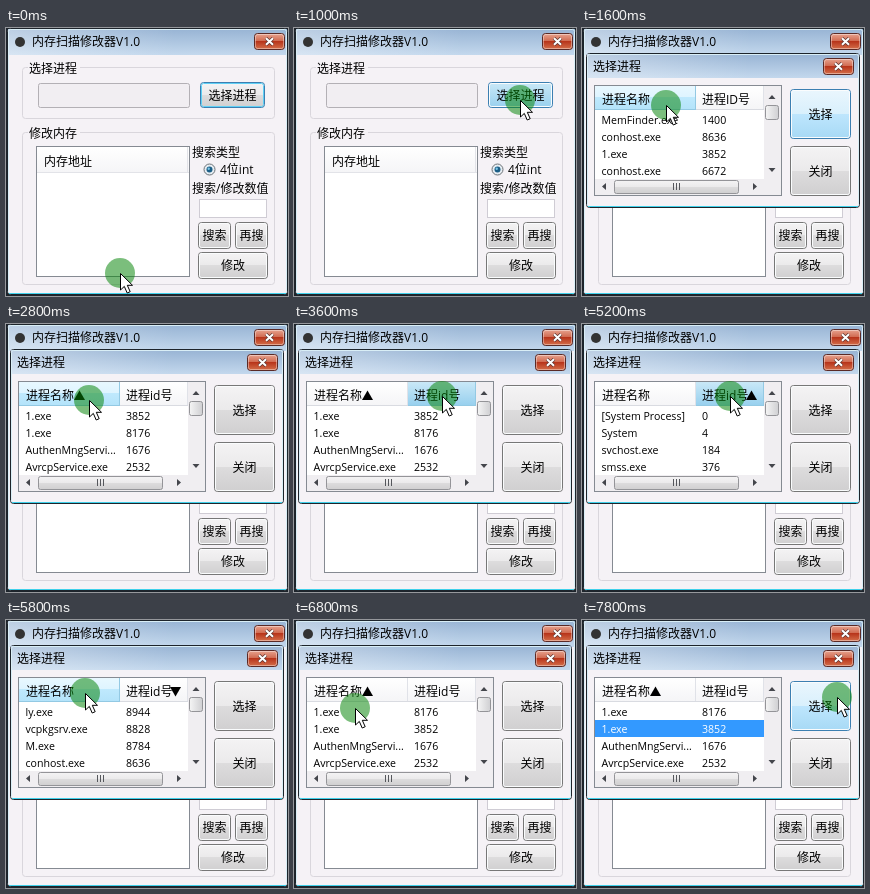
Write an HTML page that moves like this. It is 282 px wide and 268 px high and loops after 8000 ms.

```html
<!DOCTYPE html>
<html lang="zh-CN">
<head>
<meta charset="utf-8">
<title>内存扫描修改器</title>
<style>
html, body { margin: 0; width: 100%; height: 100%; overflow: hidden; background: #f5f2f6; }
svg { display: block; width: 282px; height: 268px; }
text { font: 12px "Open Sans", "Noto Sans CJK SC", "Noto Sans CJK JP", "Noto Sans CJK", sans-serif; fill: #000; white-space: pre; }
text.row { font-size: 10.6px; }
</style>
</head>
<body>
<svg id="stage" viewBox="0 0 282 268" xmlns="http://www.w3.org/2000/svg">
  <defs>
    <linearGradient id="face" x2="0" y2="1">
      <stop offset="0" stop-color="#f4f3f4"/><stop offset=".49" stop-color="#ebeaeb"/>
      <stop offset=".5" stop-color="#dddcdd"/><stop offset="1" stop-color="#d0cfd0"/>
    </linearGradient>
    <linearGradient id="hot" x2="0" y2="1">
      <stop offset="0" stop-color="#eaf6fd"/><stop offset=".49" stop-color="#d9f0fc"/>
      <stop offset=".5" stop-color="#bee6fd"/><stop offset="1" stop-color="#a7d9f5"/>
    </linearGradient>
    <linearGradient id="pressed" x2="0" y2="1">
      <stop offset="0" stop-color="#c9e8f7"/><stop offset="1" stop-color="#98d0ee"/>
    </linearGradient>
    <linearGradient id="header" x2="0" y2="1">
      <stop offset="0" stop-color="#fff"/><stop offset="1" stop-color="#f5f5f7"/>
    </linearGradient>
    <linearGradient id="headerHot" x2="0" y2="1">
      <stop offset="0" stop-color="#e8f8ff"/><stop offset=".49" stop-color="#def4ff"/>
      <stop offset=".5" stop-color="#bfe9fd"/><stop offset="1" stop-color="#b4e3fa"/>
    </linearGradient>
    <linearGradient id="thumbV"><stop offset="0" stop-color="#f5f5f5"/><stop offset="1" stop-color="#cfcfd2"/></linearGradient>
    <linearGradient id="red" x2="0" y2="1">
      <stop offset="0" stop-color="#e8a591"/><stop offset=".48" stop-color="#d0694f"/>
      <stop offset=".5" stop-color="#b8351b"/><stop offset="1" stop-color="#d5714c"/>
    </linearGradient>
    <linearGradient id="titleBar" x2="0" y2="1">
      <stop offset="0" stop-color="#98b4d4"/><stop offset="1" stop-color="#c3d8ed"/>
    </linearGradient>
    <linearGradient id="glow">
      <stop offset="0" stop-color="#fff" stop-opacity=".35"/><stop offset=".6" stop-color="#fff" stop-opacity="0"/>
    </linearGradient>
    <clipPath id="view"><rect x="13" y="59" width="169" height="91.5"/></clipPath>
  </defs>
</svg>
<script>
const stage = document.getElementById('stage');

const rect = (x, y, w, h, fill, stroke = 'none', r = 0) =>
  `<rect x="${x}" y="${y}" width="${w}" height="${h}" rx="${r}" fill="${fill}" stroke="${stroke}"/>`;
const label = (x, y, s, attrs = '') => `<text x="${x}" y="${y}" ${attrs}>${s}</text>`;
const path = (d, fill, stroke = 'none', width = 1) =>
  `<path d="${d}" fill="${fill}" stroke="${stroke}" stroke-width="${width}"/>`;

function button(x, y, w, h, s, state = 'face') {
  const focus = state === 'focus', plain = state === 'face';
  return rect(x + .5, y + .5, w - 1, h - 1, `url(#${focus ? 'face' : state})`, plain ? '#777' : '#3c7fb1', 3) +
    rect(x + 1.5, y + 1.5, w - 3, h - 3, 'none', focus ? '#5fd0f5' : '#fafcfd', 2) +
    label(x + w / 2, y + h / 2 + 4.5, s, 'text-anchor="middle"');
}

function closeButton(x, y) {
  const cross = `M${x + 12} ${y + 5.2}l7 6.6m0 -6.6l-7 6.6`;
  return rect(x + .5, y + .5, 30, 16, 'url(#red)', '#5a2a26', 3) +
    rect(x + 1.5, y + 1.5, 28, 14, 'none', 'rgba(255,255,255,.4)', 2) +
    path(cross, 'none', '#5c3733', 3.4) + path(cross, 'none', '#fff', 2);
}

// Window frame: dark outline, thin cyan edge, title bar and client area.
function frame(x, y, w, h, titleHeight) {
  return rect(x - .5, y - .5, w + 1, h + 1, '#f5f2f6', '#1d242b', 3) +
    rect(x, y, w, titleHeight, 'url(#titleBar)') + rect(x, y, w, titleHeight, 'url(#glow)') +
    rect(x + .5, y + .5, w - 1, h - 1, 'none', '#d9eef6', 2) +
    path(`M${x + 1} ${y + h - .5}h${w - 2}`, 'none', '#3fd0ea');
}

function group(y, h, s) {
  return rect(16.5, y + .5, 252, h, 'none', '#d9d6dc', 3) +
    rect(22, y - 4, 52, 9, '#f5f2f6') + label(23, y + 5.5, s);
}

function mainWindow(buttonState) {
  return rect(0, 0, 282, 268, '#1d242b') + frame(2, 1, 279, 265, 26) +
    '<circle cx="14" cy="14" r="5" fill="#333"/>' +
    label(26, 18, '内存扫描修改器V1.0') + closeButton(248, 5) +
    group(39, 51, '选择进程') + rect(32.5, 55.5, 151, 24, '#f1eef2', '#b3b0b5', 2) +
    button(194, 54, 65, 26, '选择进程', buttonState) +
    group(104, 152, '修改内存') + rect(30.5, 118.5, 153, 130, '#fff', '#858a92') +
    rect(31, 119, 152, 25, 'url(#header)') + path('M31 144.5H183M181.5 119V144', 'none', '#e2e3e8') +
    label(38, 137.5, '内存地址') + label(186, 128.5, '搜索类型') +
    '<circle cx="203.500" cy="141.500" r="5.500" fill="#e6edf2" stroke="#6c7277"/>' +
    '<circle cx="203.500" cy="141.500" r="3" fill="#1b5e86"/><circle cx="202.700" cy="140.700" r="1.200" fill="#79c5e6"/>' +
    label(214, 145.5, '4位int') + label(186, 165, '搜索/修改数值') +
    rect(193.5, 171.5, 67, 18, '#fff', '#cfccd4') +
    button(192, 194, 33, 27, '搜索') + button(229, 194, 33, 27, '再搜') + button(192, 224, 70, 27, '修改');
}

const lists = {
  start: ['MemFinder.exe 1400', 'conhost.exe 8636', '1.exe 3852', 'conhost.exe 6672'],
  name: ['1.exe 3852', '1.exe 8176', 'AuthenMngServi... 1676', 'AvrcpService.exe 2532'],
  idDown: ['ly.exe 8944', 'vcpkgsrv.exe 8828', 'M.exe 8784', 'conhost.exe 8636'],
  idUp: ['[System Process] 0', 'System 4', 'svchost.exe 184', 'smss.exe 376'],
  nameAgain: ['1.exe 8176', '1.exe 3852', 'AuthenMngServi... 1676', 'AvrcpService.exe 2532']
};

const sortMark = {
  name: 'M68 76h11l-5.500 -9.500z',
  nameAgain: 'M68 76h11l-5.500 -9.500z',
  idUp: 'M164 76h11l-5.500 -9.500z',
  idDown: 'M164 67h11l-5.500 9.500z'
};

function headerCell(x, w, over, down) {
  const fill = down ? 'pressed' : over ? 'headerHot' : 'header';
  return rect(x, 58, w, 23, `url(#${fill})`) +
    path(`M${x + w - .5} 58V81`, 'none', over ? '#93c9e3' : '#e0e2e8') +
    path(`M${x} 81.5h${w}`, 'none', over ? '#93c9e3' : '#d9dbe1');
}

function row(entry, i, selected) {
  const split = entry.lastIndexOf(' '), y = 83 + 17 * i;
  const style = `class="row"${selected ? ' style="fill:#fff"' : ''}`;
  return (selected ? rect(13, y, 169, 17, '#3399ff') : '') +
    label(19.5, y + 13, entry.slice(0, split), style) + label(120, y + 13, entry.slice(split + 1), style);
}

function scrollbars() {
  return rect(182, 58, 17, 93, '#f0eef1') + rect(13, 151, 186, 16, '#f0eef1') +
    rect(183.5, 77.5, 13, 14, 'url(#thumbV)', '#949498', 2) +
    path('M186.500 71h7l-3.500 -4zM186.500 140h7l-3.500 4z', '#44464c') +
    rect(32.5, 152.5, 124, 13, 'url(#face)', '#949498', 2) +
    path('M91.500 155v7m3 -7v7m3 -7v7', 'none', '#55575c') +
    path('M24 155v7l-4 -3.500zM171 155v7l4 -3.500z', '#44464c');
}

function dialog(s) {
  const over = s.over, title = s.list === 'start' ? '进程ID号' : '进程id号';
  return frame(5, 26, 272, 153, 24) +
    label(11, 42.5, '选择进程') + closeButton(241, 30) +
    rect(12.5, 57.5, 187, 110, '#fff', '#858a92') +
    headerCell(13, 101, over === 'name', over === 'name' && s.down) +
    headerCell(114, 68, over === 'id', over === 'id' && s.down) +
    label(20, 75.5, '进程名称') + label(120, 75.5, title) +
    path(sortMark[s.list] || '', '#000') +
    `<g clip-path="url(#view)">${lists[s.list].map((e, i) => row(e, i, i === s.selected)).join('')}</g>` +
    scrollbars() +
    button(208, 61, 61, 50, '选择', s.lit ? 'hot' : 'face') +
    button(208, 118, 61, 50, '关闭');
}

const pointer = (x, y) =>
  `<circle cx="${x}" cy="${y}" r="15" fill="#068408" fill-opacity=".53"/>` +
  path(`M${x + .5} ${y + .5}v16.500l3.800 -3.600l2.900 6.600l3 -1.300l-2.900 -6.400h5.200z`, '#fff', '#000');

// Each step holds until the next one; omitted properties carry over.
const steps = [
  { t: 0, x: 114, y: 245, open: false, list: 'start', over: '', down: false, lit: false, selected: -1 },
  { t: 200, x: 128, y: 222 },
  { t: 400, x: 168, y: 155 },
  { t: 600, x: 214, y: 88 },
  { t: 800, x: 226, y: 72, over: 'open' },
  { t: 1000, down: true },
  { t: 1200, y: 76, open: true, over: '', down: false, lit: true },
  { t: 1400, x: 172 },
  { t: 1600, x: 84, y: 77, over: 'name' },
  { t: 1800, x: 81, y: 76, lit: false },
  { t: 2000, x: 79 },
  { t: 2200, down: true },
  { t: 2400, list: 'name', down: false },
  { t: 2800, x: 83 },
  { t: 3200, x: 98, y: 75 },
  { t: 3400, x: 134, y: 73, over: 'id' },
  { t: 3600, x: 148, y: 72, down: true },
  { t: 3800, list: 'idDown', down: false },
  { t: 4200, down: true },
  { t: 4400, list: 'idUp', down: false },
  { t: 5200, down: true },
  { t: 5400, list: 'idDown', down: false },
  { t: 5800, x: 79, y: 73, over: 'name' },
  { t: 6000, x: 74 },
  { t: 6200, down: true },
  { t: 6400, list: 'nameAgain', down: false },
  { t: 6800, x: 61, y: 88, over: '' },
  { t: 7000, x: 62, y: 106 },
  { t: 7200, selected: 1 },
  { t: 7400, x: 112, y: 100 },
  { t: 7600, x: 204, y: 84 },
  { t: 7800, x: 255, y: 77, lit: true }
];

const scene = document.createElementNS('http://www.w3.org/2000/svg', 'g');
stage.append(scene);
let shown = -1;

function render(time) {
  const passed = steps.filter(step => step.t <= time);
  if (passed.length === shown) return;
  shown = passed.length;
  const s = Object.assign({}, ...passed);
  const opener = s.over === 'open' ? (s.down ? 'pressed' : 'hot') : 'focus';
  scene.innerHTML = mainWindow(opener) + (s.open ? dialog(s) : '') + pointer(s.x, s.y);
}

const begin = performance.now();
function tick() {
  render((performance.now() - begin) % 8000);
  requestAnimationFrame(tick);
}
tick();
</script>
</body>
</html>
```
